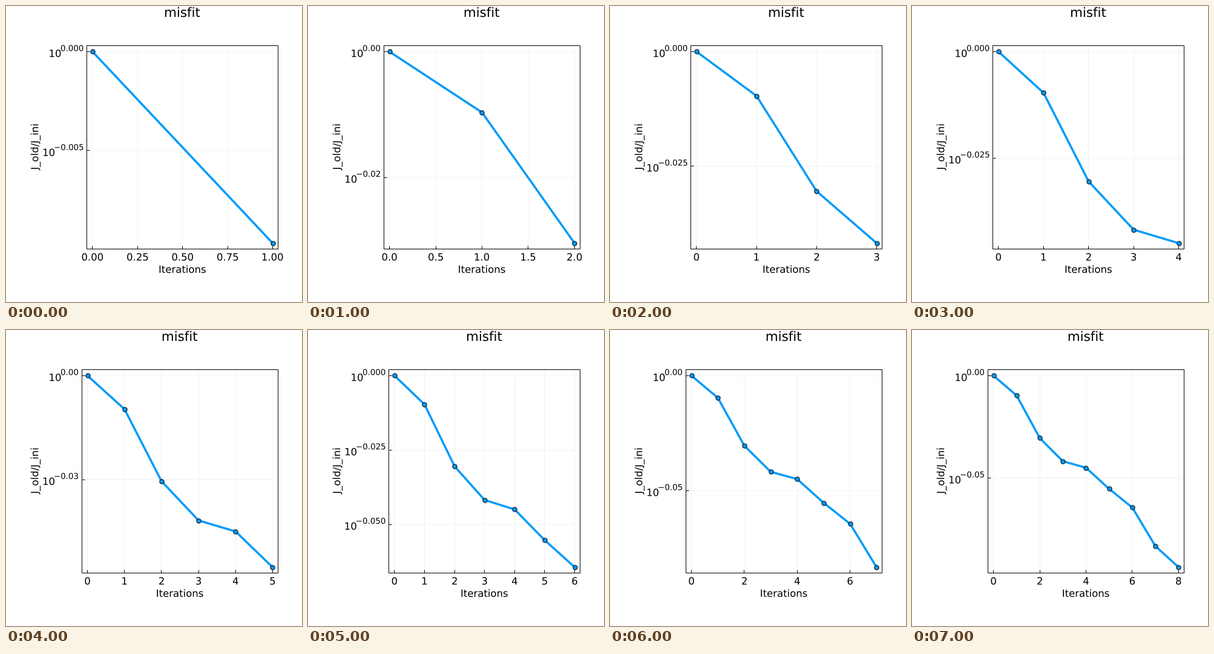
Animation of 489x489 px, one loop 8 s. Source, as a matplotlib script:

```python
import itertools
import math

import numpy as np
import matplotlib.pyplot as plt
from matplotlib.animation import FuncAnimation
from matplotlib.patches import PathPatch
from matplotlib.textpath import TextPath
from matplotlib.transforms import Affine2D

SIZE, DPI = 489, 64
PT = 72 / DPI  # points per pixel
TOP, BOTTOM, RIGHT = 65.9, 401.3, 449.5
TEXT, SUPER, TITLE = 16.5, 13.4, 21.4
BLUE, GRID = "#009AF9", "#f2f2f2"
STEPS = 8

# log10 of the relative misfit after each iteration
MISFIT = -np.array([0, 0.00967, 0.03047, 0.04181, 0.04498,
                    0.0553, 0.0644, 0.08325, 0.09353])
NICENESS = {1: 1, 5: 0.9, 2.5: 0.72, 2: 0.7, 3: 0.2}

plt.rcParams["font.family"] = "DejaVu Sans"
fig = plt.figure(figsize=(SIZE / DPI, SIZE / DPI), dpi=DPI, facecolor="white")
ax = fig.add_axes([0, 0, 1, 1])


def tick_step(span, fewest):
    """Step with the best mix of tick count, coverage and round numbers."""
    magnitude = math.floor(math.log10(span))
    best = (-1, None)
    for power, base in itertools.product((magnitude - 1, magnitude), NICENESS):
        step = base * 10.0 ** power
        count = math.floor(span / step + 1e-9) + 1
        if fewest <= count < 10:
            density = 1 - abs(count - 5) / 5
            coverage = 1.06 * span / ((count - 1) * step)
            score = density / 4 + coverage / 2 + NICENESS[base] / 4
            best = max(best, (score, step))
    return best[1]


def ticks(span, fewest):
    """Tick values from zero and the decimals needed to write them."""
    step = tick_step(span, fewest)
    decimals = 0
    while round(step * 10 ** decimals, 6) % 1:
        decimals += 1
    return np.arange(0, span + 1e-9, step), decimals


def crisp(v):
    return np.floor(v) + 0.5


def line(xs, ys, color="black", width=1.0, **kw):
    ax.plot(xs, ys, color=color, lw=width * PT, snap=False, **kw)


def rule(xs, ys, color="black"):
    line(crisp(xs), crisp(ys), color, solid_capstyle="butt",
         solid_joinstyle="miter")


def label(x, y, text, size=TEXT, align=0.5, angle=0):
    """Place text on a baseline; return the left edge of its ink."""
    path = TextPath((0, 0), text, size=size)
    box = path.get_extents()
    shift = box.x0 + align * box.width
    place = Affine2D().translate(-shift, 0).rotate_deg(angle)
    place.scale(1, -1).translate(x, y)
    ax.add_patch(PathPatch(place.transform_path(path), fc="black", lw=0))
    return x - align * box.width


def power_label(right, y, exponent):
    ink = label(right, y - 1, exponent, SUPER, align=1)
    label(ink - 0.5, y + 8.8, "10", align=1)


def draw(frame):
    ax.clear()
    ax.set_xlim(0, SIZE)
    ax.set_ylim(SIZE, 0)
    ax.axis("off")

    last = frame + 1
    values = MISFIT[:last + 1]
    drop = -values[-1]
    x_ticks, x_dec = ticks(last, fewest=4)
    y_ticks, y_dec = ticks(drop, fewest=2)

    # every decimal in the tick labels pushes the box to the right
    left = 108.4 + 8.5 * y_dec
    x_scale = (RIGHT - left) / 1.06 / last
    y_scale = (BOTTOM - TOP) / 1.06 / drop

    def px(x):
        return left + (x + 0.03 * last) * x_scale

    def py(y):
        return TOP + (0.03 * drop - y) * y_scale

    for x in px(x_ticks):
        rule([x, x], [TOP, BOTTOM], GRID)
    for y in py(-y_ticks):
        rule([left, RIGHT], [y, y], GRID)

    rule([left, RIGHT, RIGHT, left, left], [TOP, TOP, BOTTOM, BOTTOM, TOP])
    for t in x_ticks:
        x = px(t)
        rule([x, x], [BOTTOM, BOTTOM - 5])
        label(x, 420.5, f"{t:.{x_dec}f}")
    for t in y_ticks:
        y = py(-t)
        rule([left, left + 5], [y, y])
        sign = "\u2212" if t else ""
        power_label(left - 6.4, y, f"{sign}{t:.{y_dec}f}")

    xs, ys = px(np.arange(last + 1)), py(values)
    line(xs, ys, BLUE, 3.5, solid_joinstyle="round")
    line(xs, ys, ls="none", marker="o", ms=7.3 * PT, mfc=BLUE, mec="black",
         mew=PT)

    middle = (left + RIGHT) / 2
    label(middle, 18, "misfit", TITLE)
    label(middle, 440.8, "Iterations")
    label(53.2, (TOP + BOTTOM) / 2, "J_old/J_ini", angle=90)
    return []


anim = FuncAnimation(fig, draw, frames=STEPS, interval=1000,
                     repeat=True, repeat_delay=0, blit=False)
plt.show()
```
